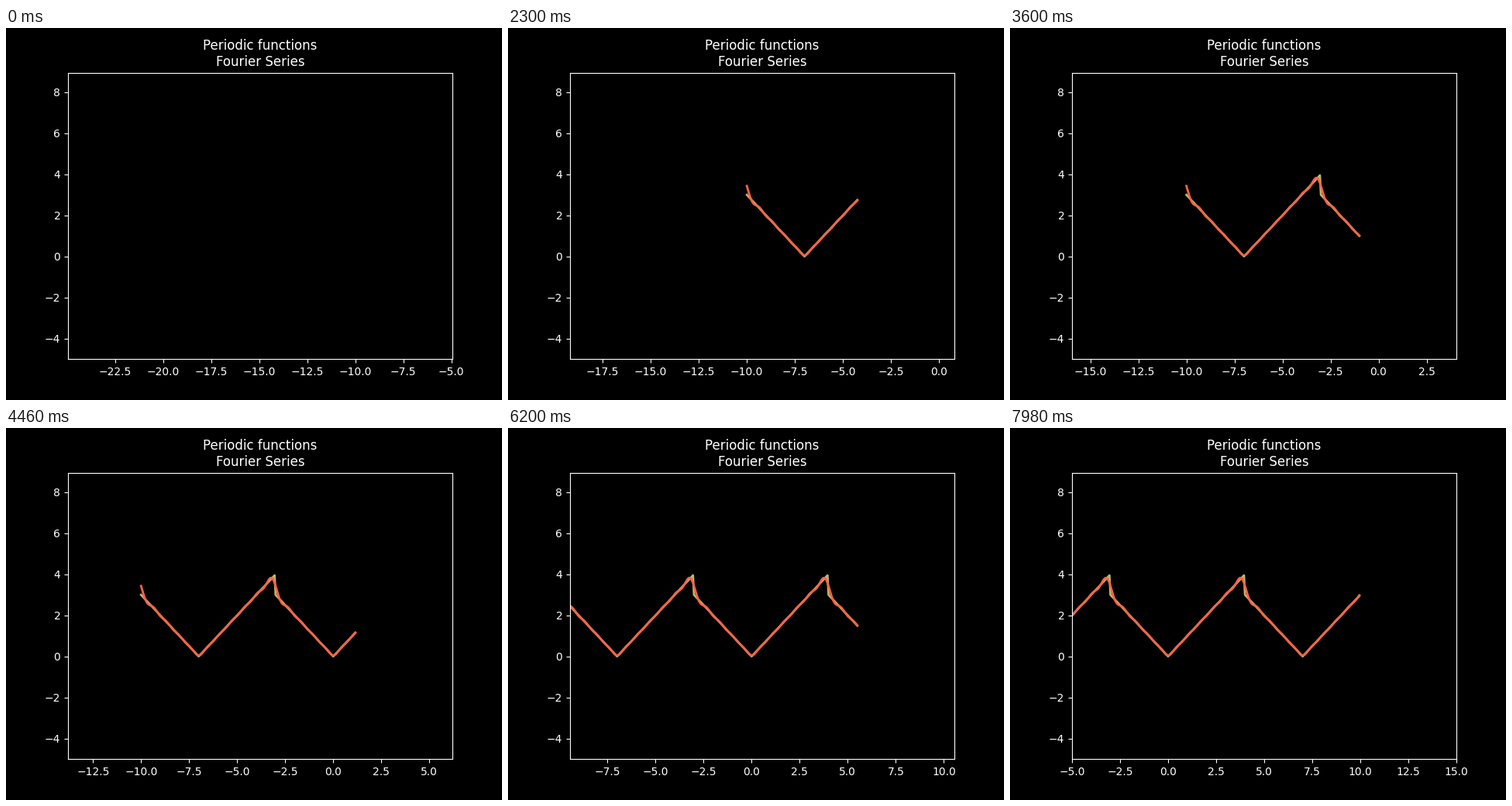
A matplotlib script that plays this animation: 640 px wide and 480 px high, repeating every 8 s.

```python
import numpy as np
import matplotlib.pyplot as plt
from matplotlib.animation import FuncAnimation

START, STEP, FRAMES = -10, 0.05, 400
PERIOD, LEFT = 7, -3
TERMS = 10


def wave(x):
    """|x| on [-3, 4), repeated with period 7."""
    return np.abs(np.round((x - LEFT) % PERIOD, 9) % PERIOD + LEFT)


def fourier(x):
    """Partial Fourier sum of wave(), with exact coefficients."""
    a, b = -LEFT, PERIOD + LEFT
    total = np.full_like(x, (a * a + b * b) / (2 * PERIOD))
    for n in range(1, TERMS + 1):
        w = 2 * np.pi * n / PERIOD
        even = [c * np.sin(w * c) / w + (np.cos(w * c) - 1) / w**2 for c in (a, b)]
        odd = [np.sin(w * c) / w**2 - c * np.cos(w * c) / w for c in (a, b)]
        total += 2 / PERIOD * (sum(even) * np.cos(w * x)
                               + (odd[1] - odd[0]) * np.sin(w * x))
    return total


x = np.round(START + STEP * np.arange(FRAMES), 2)
exact, approx = wave(x), fourier(x)

plt.style.use("dark_background")
fig, ax = plt.subplots(figsize=(6.4, 4.8), dpi=100)
ax.set_title("Periodic functions\nFourier Series")
ax.set_ylim(exact.min() - 5, exact.max() + 5)
exact_line, = ax.plot([], [], color="darkkhaki", lw=2)
approx_line, = ax.plot([], [], color="tomato", lw=2)


def update(i):
    n = i + 1
    exact_line.set_data(x[:n], exact[:n])
    approx_line.set_data(x[:n], approx[:n])
    head = round(START + STEP * n, 2)
    ax.set_xlim(head - 15, head + 5)
    return exact_line, approx_line


anim = FuncAnimation(fig, update, frames=FRAMES, interval=20,
                     repeat=True, repeat_delay=0)
plt.show()
```
